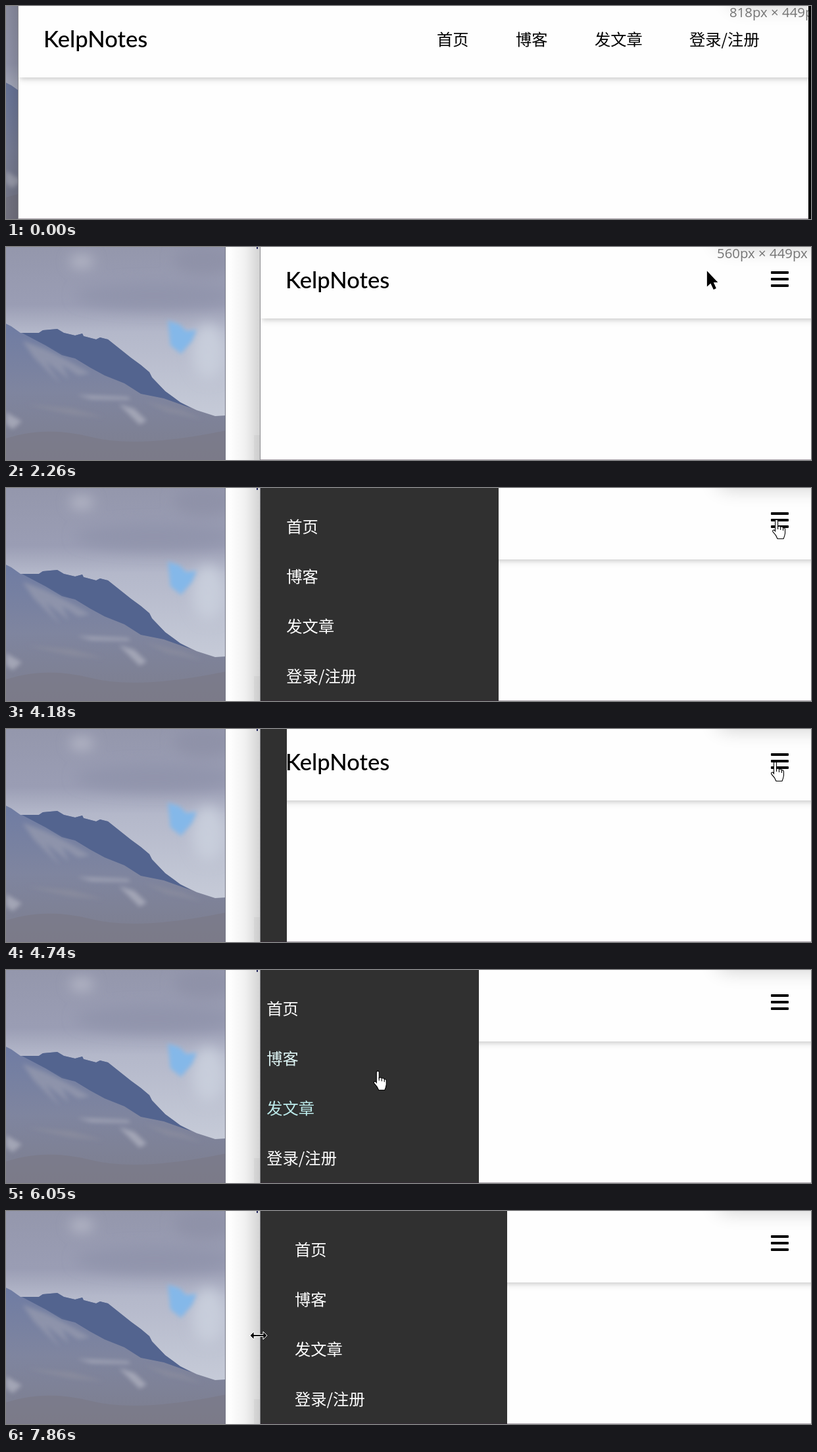
Animation of 1224 by 325 pixels, one loop 8000 ms. Source, as an HTML page:

```html
<!DOCTYPE html>
<html lang="zh-CN">
<head>
<meta charset="utf-8">
<title>Responsive navigation</title>
<style>
html, body { margin: 0; width: 100%; height: 100%; overflow: hidden; background: #fff; }
#stage { position: relative; width: 1224px; height: 325px; overflow: hidden; }
#stage div, #stage svg { position: absolute; }
.text { white-space: pre; line-height: 30px; font: 24.3px/30px "Noto Sans CJK SC", "Noto Sans CJK", sans-serif; }
#behind { left: 334px; top: 0; width: 900px; height: 325px; background: #fefefe; }
#edge { top: 0; width: 46px; height: 325px; border-right: 1px solid #8b8b8f;
  background: linear-gradient(90deg, transparent, rgba(0,0,0,.05) 50%, rgba(0,0,0,.17)); }
#page { top: 0; right: 0; height: 325px; overflow: hidden; background: #fefefe; }
#header { left: 0; top: 0; width: 1300px; height: 109px; background: #fefefe;
  box-shadow: 0 6px 9px -1.5px rgba(0,0,0,.1), 0 3px 6px -1.5px rgba(0,0,0,.1); }
#title { left: 38px; top: 35px; font: 500 34.6px/30px Lato, sans-serif; color: #000; }
#menu { top: 0; width: 375px; height: 325px; background: #303030; }
#right { left: 0; top: 0; }
#shade { left: 1105px; top: -26px; width: 200px; height: 22px; border-radius: 10px; box-shadow: 0 0 30px 4px rgba(0,0,0,.2); }
#size { left: 1100px; top: -6px; font: 20.4px/30px "Open Sans", sans-serif; color: #757575; }
#bars div { left: 1182px; width: 27px; height: 4px; border-radius: 1px; background: #000; }
#floor { top: 324px; right: 0; height: 1px; background: rgba(60,40,60,.42); }
#wall { left: 1220px; top: 0; width: 4px; height: 325px; background: #000; }
#cursors { left: 0; top: 0; }
</style>
</head>
<body>
<div id="stage">
  <svg width="334" height="325">
    <defs>
      <linearGradient id="sky" x2="0" y2="1">
        <stop offset="0" stop-color="#9497ac"/><stop offset=".27" stop-color="#9a9db4"/>
        <stop offset=".4" stop-color="#b4b8ca"/><stop offset=".8" stop-color="#c6cbd8"/>
      </linearGradient>
      <linearGradient id="rock" x2="0" y2="1">
        <stop offset="0" stop-color="#6f7ca3"/><stop offset=".5" stop-color="#7f859f"/>
        <stop offset="1" stop-color="#7d7e8e"/>
      </linearGradient>
      <filter id="soft" x="-50%" y="-50%" width="200%" height="200%"><feGaussianBlur stdDeviation="10"/></filter>
      <filter id="fine" x="-50%" y="-50%" width="200%" height="200%"><feGaussianBlur stdDeviation="3"/></filter>
    </defs>
    <rect width="334" height="325" fill="url(#sky)"/>
    <g filter="url(#soft)">
      <ellipse cx="115" cy="22" rx="18" ry="9" fill="#babcca"/>
      <ellipse cx="225" cy="74" rx="120" ry="20" fill="#9194ac"/>
      <ellipse cx="300" cy="20" rx="45" ry="22" fill="#8f92a8"/>
      <ellipse cx="308" cy="160" rx="25" ry="42" fill="#c8cedb"/>
    </g>
    <path d="M246 112L264 118 274 128 290 126 283 143 266 163 250 150Z" fill="#84b8e9" filter="url(#fine)"/>
    <path d="M0 117L8 121 22 131 50 131 56 127 78 125 88 131 105 135 116 132 118 136 137 141 143 138 155 141 165 149 190 169 205 180 218 191 222 199 242 220 265 237 290 249 318 258 334 257V325H0Z" fill="url(#rock)"/>
    <path d="M24 131L50 131 56 127 78 125 88 131 105 135 116 132 118 136 137 141 143 138 155 141 165 149 190 169 205 180 218 191 222 199 242 220 265 237 282 246 240 231 205 224 180 208 150 196 128 184 105 170 85 165 60 150Z" fill="#53648f"/>
    <g fill="#959aae" filter="url(#fine)" opacity=".75">
      <path d="M25 143L60 156 92 172 128 193 110 196 85 180 96 202 60 174 82 208 42 168Z"/>
      <path d="M108 226L185 229 190 233 130 232ZM172 240L195 247 214 265 203 271 188 256ZM0 252L24 266 10 278 0 270Z" fill="#afb1bf"/>
      <path d="M30 240L100 246 150 260 100 256ZM210 235L270 250 300 263 245 252Z" fill="#8b8d9e"/>
    </g>
    <path d="M0 292Q60 272 130 290T334 280V325H0Z" fill="#7a7986" opacity=".6"/>
    <path d="M333.5 0V325" stroke="#777986"/>
  </svg>
  <div id="behind">
    <div style="left:47px;top:0;width:2px;height:3px;background:#2b2f70"></div>
    <div style="left:43px;top:287px;width:10px;height:38px;background:#f5f5f5"></div>
  </div>
  <div id="edge"></div>
  <div id="page">
    <div id="header"></div>
    <div id="title" class="text">KelpNotes</div>
    <div id="menu"></div>
  </div>
  <div id="right">
    <div id="shade"></div>
    <div id="size" class="text"></div>
    <div id="links"></div>
    <div id="bars"><div style="top:37px"></div><div style="top:47px"></div><div style="top:57px"></div></div>
  </div>
  <div id="floor"></div>
  <div id="wall"></div>
  <svg id="cursors" width="1224" height="325">
    <path id="arrow" d="M0 0V24L5.500 19 10 28.500 14 26.500 10 17.500H16.500Z" fill="#000"/>
    <g id="hand" fill="#fff" stroke="#000" stroke-width="1.1">
      <path d="M-1.500 1.500Q.5-1 2.500 1.500V11Q5 9 6.500 11.500 9 10 10.500 13 13 12 13.500 15V21Q13 25 11 29.500H2Q0 24-5 19-6.500 16-3 16L-1.500 18Z"/>
      <path d="M2.500 10V15M6.500 12V16M10.500 13V17" fill="none"/>
    </g>
    <path id="resize" d="M-13 0L-7-6V-1.500H7V-6L13 0 7 6V1.500H-7V6Z" fill="#000" stroke="#fff" stroke-width="1"/>
  </svg>
</div>
<script>
const $ = id => document.getElementById(id);
const LOOP = 8000, MENU_WIDTH = 375, MENU_LEFT = 387;
const labels = ['首页', '博客', '发文章', '登录/注册'];

function addText(parent, text, x, y, color) {
  const el = document.createElement('div');
  el.className = 'text';
  el.textContent = text;
  el.style.cssText = `left:${x}px;top:${y - 16}px;color:${color}`;
  parent.append(el);
  return el;
}
labels.forEach((text, i) => addText($('links'), text, [655, 775, 895, 1039][i], 51, '#000'));
const items = labels.map((text, i) => addText($('menu'), text, 52, 59 + 76 * i, '#fff'));

// Each key is [time, value, ...]; values are joined linearly.
const windowKeys = [[30, 19], [530, 222], [725, 222], [790, 283], [1000, 338], [1180, 372], [1330, 387]];
const pointerKeys = [
  [1850, 762, 209], [2050, 925, 112], [2260, 1065.5, 36.5], [2540, 1168, 44], [2670, 1173, 45], [2870, 1175, 46],
  [3550, 1175, 47], [4200, 1171, 48], [4740, 1169, 50], [5500, 1168, 50], [5920, 690, 215], [6050, 565, 154],
  [6350, 500, 110], [6650, 455, 265], [6950, 316, 205], [7170, 380, 190], [7270, 450, 50], [7400, 450, 290],
  [7520, 396, 196], [7700, 396, 196], [7780, 384, 190]
];

function track(keys, t) {
  const next = keys.findIndex(k => k[0] > t);
  if (next < 0) return keys[keys.length - 1].slice(1);
  if (next === 0) return keys[0].slice(1);
  const a = keys[next - 1], b = keys[next], p = (t - a[0]) / (b[0] - a[0]);
  return a.slice(1).map((v, i) => v + (b[i + 1] - v) * p);
}

// CSS "ease": cubic-bezier(.25, .1, .25, 1)
function ease(x) {
  if (x <= 0) return 0;
  if (x >= 1) return 1;
  let lo = 0, hi = 1, s;
  for (let i = 0; i < 20; i++) {
    s = (lo + hi) / 2;
    if (.75 * s * (1 - s) + s ** 3 < x) lo = s; else hi = s;
  }
  return .3 * s * (1 - s) ** 2 + 3 * s * s * (1 - s) + s ** 3;
}

function menuOpen(t) {
  if (t < 4130) return ease((t - 3200) / 1000);
  if (t < 5450) return 1 - ease((t - 4130) / 1000);
  return ease((t - 5450) / 1000);
}
const menuEdge = t => MENU_LEFT + MENU_WIDTH * menuOpen(t);

function hoveredItem(t) {
  const [x, y] = track(pointerKeys, t);
  return x > 420 && x < menuEdge(t) ? Math.floor((y - 21) / 76) : -1;
}

// Share of the last 300 ms spent over an item: a linear colour transition.
function tint(item, t) {
  let sum = 0;
  for (let k = 0; k < 20; k++) sum += hoveredItem(t - k * 15) === item;
  return sum / 20;
}

function drawPointer(t) {
  const [x, y] = track(pointerKeys, t);
  let kind = 'arrow';
  if (Math.abs(x - 384) < 5) kind = 'resize';
  else if (x >= 1163 || (x > MENU_LEFT && x < menuEdge(t))) kind = 'hand';
  for (const id of ['arrow', 'hand', 'resize']) {
    $(id).style.display = t >= 1850 && id === kind ? '' : 'none';
    $(id).setAttribute('transform', `translate(${x} ${y})`);
  }
}

function draw(t) {
  const left = Math.round(track(windowKeys, t)[0]);
  const moved = left - 19, width = Math.round(818 - moved * .7011);
  $('edge').style.left = left - 47 + 'px';
  $('page').style.left = $('floor').style.left = left + 'px';
  $('right').style.left = -Math.round(moved * .0513) + 'px';
  $('size').textContent = t < 2400 ? `${width}px × 449px` : '';
  $('links').style.display = width > 750 ? '' : 'none';
  $('bars').style.display = width > 750 ? 'none' : '';
  $('wall').style.display = left < 30 ? '' : 'none';
  $('menu').style.left = MENU_WIDTH * (menuOpen(t) - 1) + 'px';
  items.forEach((el, i) => {
    const p = tint(i, t), mix = c => Math.round(255 + (c - 255) * p);
    el.style.color = `rgb(${mix(30)},${mix(184)},${mix(184)})`;
  });
  drawPointer(t);
}

const start = performance.now();
function frame() {
  draw((performance.now() - start) % LOOP);
  requestAnimationFrame(frame);
}
frame();
</script>
</body>
</html>
```
